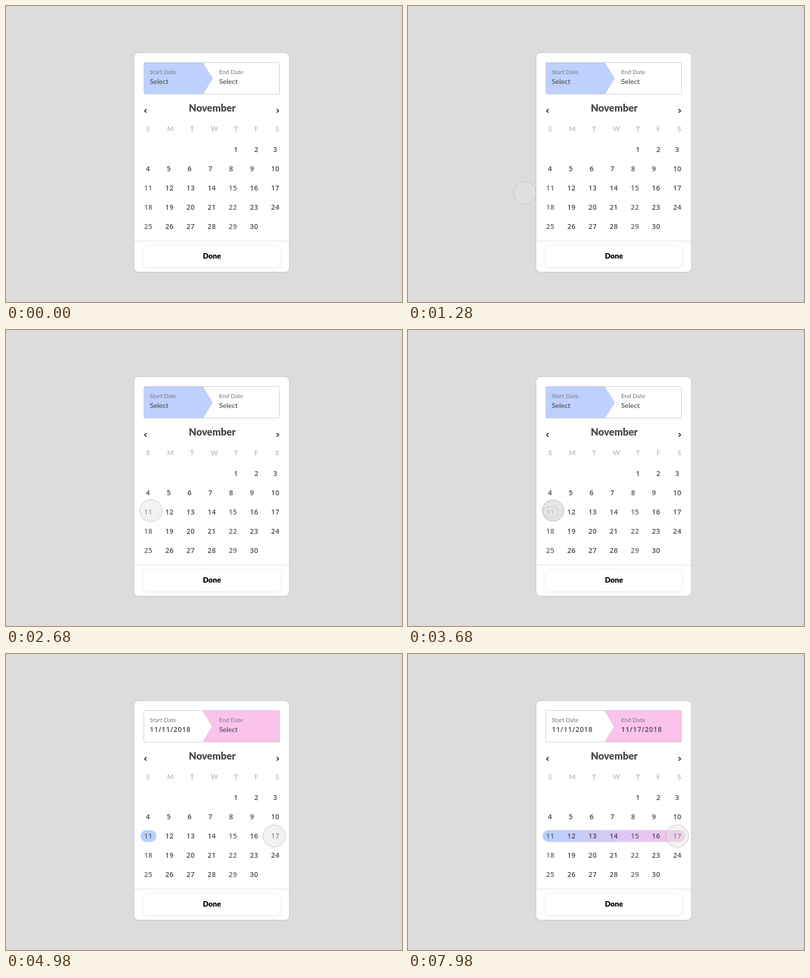
Write an HTML page that moves like this. It is 800 px wide and 600 px high and loops after 8000 ms.

```html
<!DOCTYPE html>
<html lang="en">
<head>
<meta charset="utf-8">
<title>Date range picker</title>
<style>
  html, body { margin: 0; width: 100%; height: 100%; overflow: hidden; background: #dcdcdc; }
  svg { display: block; width: 800px; height: 600px; }
  text { font-family: Lato, "Open Sans", sans-serif; fill: #4a4a4a; }
  .label { font-size: 12px; fill: #808080; font-weight: 500; }
  .value { font-size: 14px; font-weight: 500; }
  .date { font: 600 14px "Open Sans", "Noto Sans", sans-serif; letter-spacing: .8px; }
  .month { font-size: 20px; font-weight: 900; text-anchor: middle; }
  .week { font-size: 14px; font-weight: 700; fill: #c0c0c0; text-anchor: middle; }
  .day { font: 600 14px "Open Sans", "Noto Sans", sans-serif; letter-spacing: .4px; text-anchor: middle; }
  .soft { fill: #646464; }
  .done { font-size: 15px; font-weight: 900; fill: #000; text-anchor: middle; }
  .button { filter: drop-shadow(0 1px 5px rgba(0, 0, 0, .09)); }
</style>
</head>
<body>
<svg viewBox="0 0 800 600">
  <defs>
    <linearGradient id="range" gradientUnits="userSpaceOnUse" x1="272" x2="560">
      <stop offset="0" stop-color="#b5d0ff"/>
      <stop offset=".5" stop-color="#d8c9f5"/>
      <stop offset="1" stop-color="#fbc2eb"/>
    </linearGradient>
  </defs>

  <rect width="800" height="600" fill="#dcdcdc"/>
  <rect x="258.5" y="94.5" width="314" height="445" rx="9" fill="#fff" stroke="#bebebe"/>

  <path id="startFill" d="M279 115H398L418 147 398 179H279Z" fill="#bdd0ff"/>
  <g id="endFill">
    <path d="M397.5 115H553V179H397.5L417 147Z" fill="#fbc2eb"/>
    <path d="M397.5 115L417 147 397.5 179" fill="none" stroke="#cfc4cc"/>
  </g>
  <rect x="278.5" y="114.5" width="274" height="64" rx="2" fill="none" stroke="#c9c9c9"/>
  <text class="label" x="290.5" y="138">Start Date</text>
  <text class="label" x="430.5" y="138">End Date</text>
  <text class="value" id="startEmpty" x="290.5" y="158">Select</text>
  <text class="date" id="startDate" x="290.5" y="158">11/11/2018</text>
  <text class="value" id="endEmpty" x="430.5" y="158">Select</text>
  <text class="date" id="endDate" x="430.5" y="158">11/17/2018</text>

  <g fill="none" stroke="#111" stroke-width="1.7">
    <path d="M284 208.8L280 212.5 284 216.2"/>
    <path d="M546.8 208.8L550.8 212.5 546.8 216.2"/>
  </g>
  <text class="month" x="416.5" y="214">November</text>

  <rect id="bar" x="272" y="357" width="32" height="24" rx="12"/>
  <g id="grid"></g>

  <path d="M259 476.5H572" stroke="#dadada"/>
  <rect class="button" x="278" y="487" width="275" height="42" rx="9" fill="#fff"/>
  <text class="done" x="416" y="512">Done</text>

  <g id="cursor">
    <circle id="disc" r="22.5"/>
    <circle id="inner" r="21.6" fill="none" stroke="#fff" stroke-opacity=".5" stroke-width=".8"/>
  </g>
  <rect id="ring" y="358" width="30" height="22" rx="11" fill="none" stroke-width="2"/>
</svg>
<script>
const LOOP = 8000;
const $ = id => document.getElementById(id);
const clamp = v => Math.min(1, Math.max(0, v));
const ramp = (t, a, b) => clamp((t - a) / (b - a));

function addText(cls, x, y, str) {
  const el = document.createElementNS('http://www.w3.org/2000/svg', 'text');
  el.setAttribute('class', cls);
  el.setAttribute('x', x);
  el.setAttribute('y', y);
  el.textContent = str;
  $('grid').append(el);
}

const weekX = [287, 332, 376, 421, 465, 506, 548];
[...'SMTWTFS'].forEach((s, i) => addText('week', weekX[i], 253.5, s));

const firstRow = { 4: 464.5, 5: 506, 6: 544 };
for (let day = 1; day <= 30; day++) {
  const col = (day + 3) % 7, row = Math.floor((day + 3) / 7);
  const x = row === 0 ? firstRow[col]
    : row === 1 && col < 6 ? 287 + 42 * col
    : 287.5 + 42.75 * col;
  const soft = row > 1 && (col === 0 || col === 4);
  addText(soft ? 'day soft' : 'day', x, 296 + 39 * row, day);
}

// Cursor moves: [time, x, y]; it rests between moves.
const moves = [
  [[460, 238, -15], [540, 170, 60], [640, 90, 190], [720, 72, 270], [800, 95, 325], [900, 142, 355]],
  [[1120, 142, 355], [1180, 165, 364], [1280, 236, 379], [1360, 257, 380], [1480, 269, 375], [1620, 273, 371.5]],
  [[2100, 273, 371.5], [2120, 274, 372], [2300, 283, 372.5], [2500, 290, 368.5], [2740, 293, 366]],
  [[4300, 293, 366], [4400, 352, 360], [4520, 447, 356], [4640, 503, 359], [4780, 530, 365], [4980, 542, 369]],
  [[7980, 544, 369]]
];

function slope(pts, i, k) {
  const a = pts[i - 1], b = pts[i + 1];
  return a && b ? (b[k] - a[k]) / (b[0] - a[0]) : 0;
}

function cursorAt(t) {
  const pts = moves.filter(m => m[0][0] <= t).pop();
  if (!pts) return null;
  const i = pts.findIndex(p => p[0] > t) - 1;
  if (i < 0) return pts[pts.length - 1].slice(1);
  const a = pts[i], b = pts[i + 1], d = b[0] - a[0], u = (t - a[0]) / d;
  return [1, 2].map(k =>
    a[k] * (1 + 2 * u) * (1 - u) ** 2 + b[k] * u * u * (3 - 2 * u) +
    d * u * (1 - u) * (slope(pts, i, k) * (1 - u) - slope(pts, i + 1, k) * u));
}

function attrs(el, map) {
  for (const k in map) el.setAttribute(k, map[k]);
}
const fade = (id, v) => { $(id).style.opacity = v; };

function render(t) {
  const start = ramp(t, 3840, 4040);
  const end = ramp(t, 7120, 7480);
  const text = ramp(t, 7120, 7300);
  const startOn = t < 3880 ? 0 : start;
  fade('startFill', 1 - startOn);
  fade('endFill', startOn);
  fade('startEmpty', 1 - startOn);
  fade('startDate', startOn);
  const endOn = t < 7140 ? 0 : text;
  fade('endEmpty', 1 - endOn);
  fade('endDate', endOn);

  fade('bar', startOn);
  const grow = t < 7140 ? 0 : 1 - (1 - end) ** 2;
  attrs($('bar'), { width: 32 + 256 * grow, fill: grow ? 'url(#range)' : '#b5d0ff' });

  const first = t >= 3680 && t < 3880, second = t >= 6980 && t < 7140;
  const down = first || second;
  const pos = cursorAt(t);
  fade('cursor', pos ? 1 : 0);
  if (pos) attrs($('cursor'), { transform: `translate(${pos[0]} ${pos[1]})` });
  attrs($('disc'), {
    r: down ? 21.5 : 22.5,
    fill: down ? 'rgba(222,222,222,.75)' : 'rgba(226,226,226,.45)',
    stroke: down ? '#a9a9a9' : 'rgba(150,150,150,.65)'
  });
  fade('inner', down ? 0 : 1);
  fade('ring', down ? 1 : 0);
  attrs($('ring'), { x: first ? 273 : 529, stroke: first ? '#d3d6e4' : '#e2d1d6' });
}

const began = performance.now();
function tick() {
  const t = (performance.now() - began) % LOOP;
  render(Math.floor(t / 20) * 20);
  requestAnimationFrame(tick);
}
render(0);
requestAnimationFrame(tick);
</script>
</body>
</html>
```
